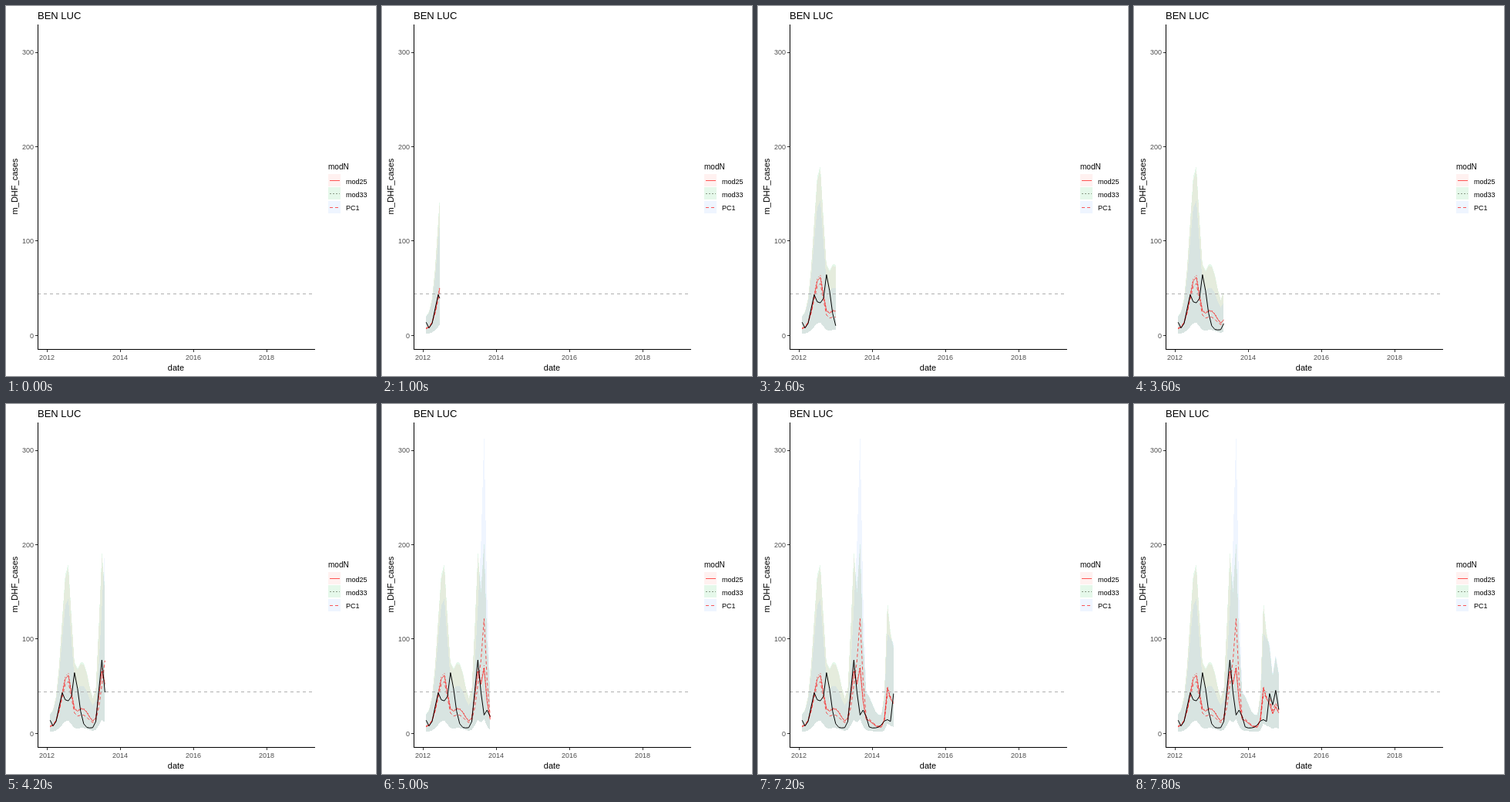
An HTML page for the animation above (8000 ms loop, 480x480 px).

```html
<!DOCTYPE html>
<html lang="en">
<head>
<meta charset="utf-8">
<title>BEN LUC</title>
<style>
  html, body { margin: 0; width: 100%; height: 100%; overflow: hidden; background: #fff; }
  svg { display: block; width: 100%; height: 100%; font-family: "Liberation Sans", Arial, sans-serif; }
  path { fill: none; }
  .ribbon, .crisp { shape-rendering: crispEdges; }
  .ribbon { fill-opacity: .1; }
  .mod25 { fill: #f8766d; }
  .mod33 { fill: #00ba38; }
  .pc1 { fill: #619cff; }
  .model { stroke: #f00; stroke-opacity: .65; }
  .dotted { stroke-dasharray: 1 3; }
  .dashed { stroke-dasharray: 4 3; }
  .small { font-size: 9px; }
  .tick { fill: #4d4d4d; }
  .label { font-size: 11px; }
</style>
</head>
<body>
<svg viewBox="0 0 480 480">
  <text x="41" y="17" font-size="13">BEN LUC</text>

  <path id="ribbon25" class="ribbon mod25"/>
  <path id="ribbon33" class="ribbon mod33"/>
  <path id="ribbonPc" class="ribbon pc1"/>
  <path id="line25" class="model"/>
  <path id="line33" class="model dotted"/>
  <path id="linePc" class="model dashed"/>
  <path id="lineCases" stroke="#000"/>
  <path class="crisp" d="M41 373.5H399" stroke="#b0b0b0" stroke-dasharray="4 4"/>

  <path class="crisp" d="M41.5 24V445.5H401" stroke="#000"/>
  <path class="crisp" d="M38 427.5h3M38 304.5h3M38 182.5h3M38 60.5h3M53.5 446v3M148.5 446v3M243.5 446v3M338.5 446v3" stroke="#333"/>
  <g class="small tick" text-anchor="end">
    <text x="36" y="431">0</text>
    <text x="36" y="308">100</text>
    <text x="36" y="186">200</text>
    <text x="36" y="63">300</text>
  </g>
  <g class="small tick" text-anchor="middle">
    <text x="53" y="459">2012</text>
    <text x="148" y="459">2014</text>
    <text x="243" y="459">2016</text>
    <text x="338" y="459">2018</text>
  </g>
  <g class="label" text-anchor="middle">
    <text x="220.5" y="473">date</text>
    <text transform="translate(15 234) rotate(-90)">m_DHF_cases</text>
  </g>

  <text x="418" y="212" font-size="10">modN</text>
  <path class="ribbon mod25" d="M418 218h16v16h-16z"/>
  <path class="ribbon mod33" d="M418 235h16v16h-16z"/>
  <path class="ribbon pc1" d="M418 253h16v16h-16z"/>
  <path class="model" d="M420 226.5h13"/>
  <path d="M420 243.5h13" stroke="#8c9a88" stroke-dasharray="2 2"/>
  <path class="model dashed" d="M420 261.5h13"/>
  <g class="small">
    <text x="441" y="231">mod25</text>
    <text x="441" y="248">mod33</text>
    <text x="441" y="265">PC1</text>
  </g>
</svg>
<script>
  const ZERO = 427.3;
  const DAY = 864e5;
  const STEP = 200;
  const FRAMES = 40;

  // Outbreaks: month since February 2012, rise and fall in months, height in px
  const outbreaks = [
    { at: 5.7, rise: 2.6, fall: 1.7, mod: 66, pc: 58 },
    { at: 10.5, rise: 3.2, fall: 3.2, mod: 24, pc: 15 },
    { at: 17, rise: 1.4, fall: .8, mod: 65, pc: 40 },
    { at: 19, rise: 1.3, fall: 1.05, mod: 76, pc: 139 },
    { at: 21.5, rise: 1.5, fall: 2, mod: 9, pc: 10 },
    { at: 28, rise: .8, fall: .9, mod: 45, pc: 34 },
    { at: 29.7, rise: 1.3, fall: 1.1, mod: 32, pc: 38 },
    { at: 32, rise: 1, fall: 1.7, mod: 26, pc: 30 },
  ];
  const reported = [
    { at: 0, rise: 1, fall: .7, count: 10 },
    { at: 4, rise: 1.6, fall: 1, count: 40 },
    { at: 6, rise: 1.5, fall: 1.5, count: 34 },
    { at: 8, rise: .9, fall: 1.9, count: 66 },
    { at: 17, rise: 1.3, fall: 1.2, count: 88 },
    { at: 20.3, rise: 1.5, fall: 1, count: 24 },
    { at: 27.8, rise: 1.8, fall: 1.5, count: 11 },
    { at: 30, rise: .6, fall: 1, count: 43 },
    { at: 32, rise: .9, fall: 1.2, count: 48 },
  ];

  const curve = (bumps, key, base) => month => bumps.reduce((sum, b) => {
    const width = month < b.at ? b.rise : b.fall;
    return sum + b[key] * Math.exp(-(((month - b.at) / width) ** 2));
  }, base);
  const scaled = (f, k) => month => f(month) * k;

  const mod25 = curve(outbreaks, "mod", 8);
  const pc1 = curve(outbreaks, "pc", 9);
  const lower = scaled(mod25, .22);
  const lines = {
    line25: mod25,
    line33: scaled(mod25, 1.04),
    linePc: pc1,
    lineCases: curve(reported, "count", 7),
  };
  const ribbons = {
    ribbon25: scaled(mod25, 2.85),
    ribbon33: scaled(mod25, 2.92),
    ribbonPc: scaled(pc1, 2.6),
  };

  const start = Date.UTC(2012, 0, 1);
  const dateX = month => 53.2 + (Date.UTC(2012, month + 1, 1) - start) / DAY * .1301;

  function reveal(height, progress) {
    const point = month => [dateX(month), ZERO - height(month)];
    const last = Math.floor(progress);
    const part = progress - last;
    const points = Array.from({ length: last + 1 }, (_, month) => point(month));
    if (part) {
      const next = point(last + 1);
      points.push(points[last].map((v, i) => v + (next[i] - v) * part));
    }
    return points;
  }

  const toPath = points => "M" + points.map(p => p.map(v => v.toFixed(2)).join(" ")).join("L");
  const setPath = (id, d) => document.getElementById(id).setAttribute("d", d);

  function draw(frame) {
    // Five months pass in every six steps, the fifth step being a half month
    const step = frame % 6;
    const progress = 5 * Math.floor(frame / 6) + (step === 5 ? 4.5 : step);
    for (const id in lines) {
      setPath(id, progress ? toPath(reveal(lines[id], progress)) : "");
    }
    const base = reveal(lower, progress).reverse();
    for (const id in ribbons) {
      setPath(id, progress ? toPath(reveal(ribbons[id], progress).concat(base)) + "Z" : "");
    }
  }

  let shown = -1;
  function tick() {
    const frame = Math.floor(performance.now() / STEP) % FRAMES;
    if (frame !== shown) draw(shown = frame);
    requestAnimationFrame(tick);
  }
  tick();
</script>
</body>
</html>
```
